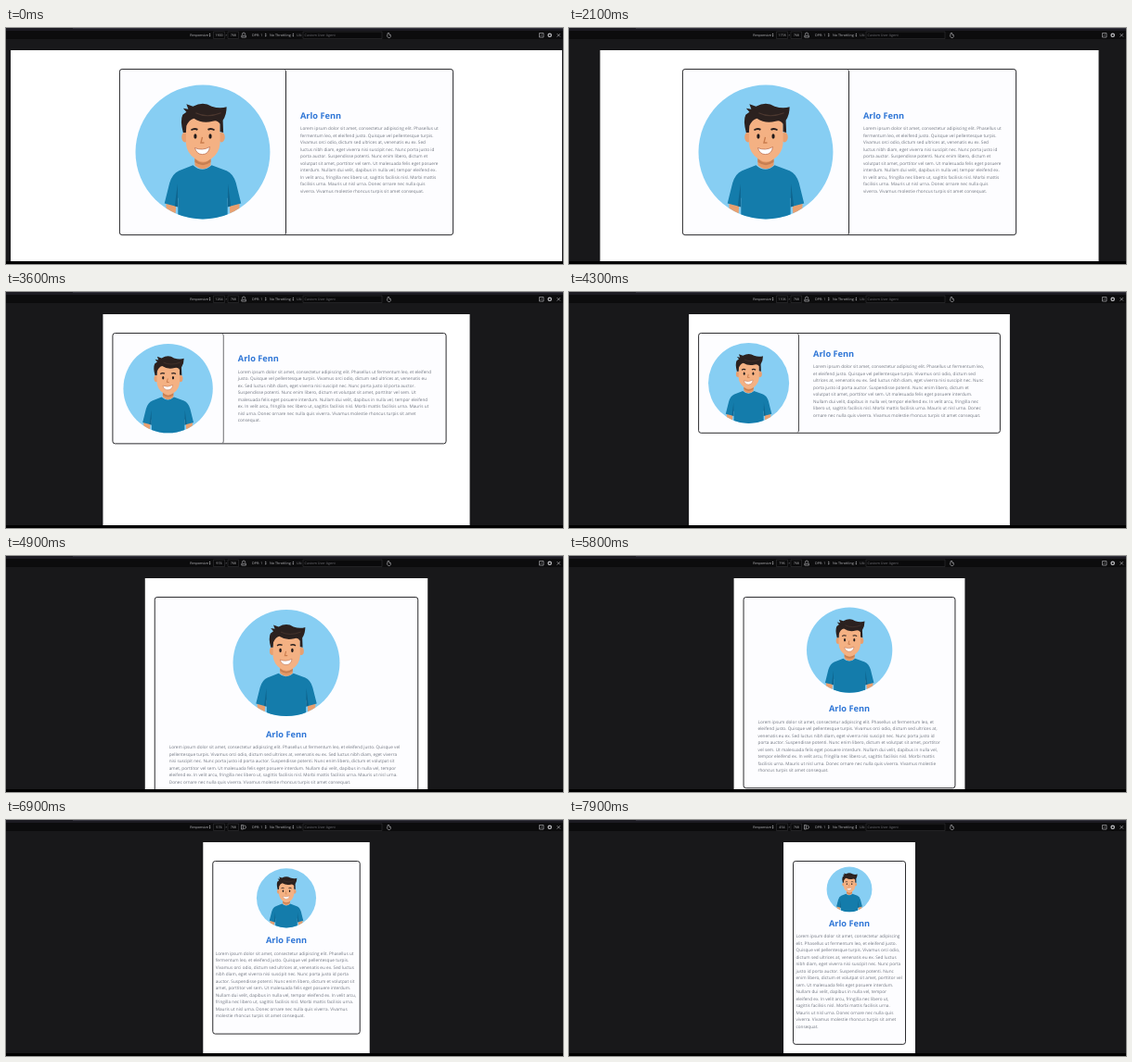
Animation, 600 px wide and 255 px high, one loop 8 s. Source, as an HTML page:

```html
<!DOCTYPE html>
<html lang="en">
<head>
<meta charset="utf-8">
<title>Responsive card</title>
<style>
  * { box-sizing: border-box; margin: 0; }
  html, body { width: 100%; height: 100%; overflow: hidden; background: #000; }
  body { position: relative; font-family: "Open Sans", "Noto Sans", sans-serif; text-rendering: geometricPrecision; }
  .desk { position: absolute; top: 0; left: 0; width: 600px; height: 252px; overflow: hidden; background: #18181a; }
  .bar { position: absolute; top: 0; left: 0; }
  .page {
    --scale: .3126;
    position: absolute; top: 24px; left: 302.4px;
    width: calc(var(--w) * 1px); height: 730px; overflow: hidden;
    background: #fff; container-type: inline-size;
    transform-origin: 0 0;
    transform: scale(var(--scale)) translateX(-50%);
  }
  .card {
    max-width: 1152px; margin: 64px 32px;
    border: 3px solid #1d1d20; border-radius: 10px; background: #fdfdff;
  }
  .pic { overflow: hidden; }
  .pic svg { display: block; width: 50%; margin: 0 auto; }
  .info { padding: 0 8px 48px; }
  h1 { font-size: 29.5px; line-height: 40px; font-weight: 700; color: #2f76d6; text-align: center; margin-bottom: 14px; }
  p { font-size: 15.04px; line-height: 24px; color: #70757f; }
  @container (min-width: 768px) { .info { padding: 0 48px 48px; } }
  @container (min-width: 1024px) {
    .card { display: flex; align-items: center; }
    .pic { flex: 0 0 33.333%; border-right: 3px solid #1d1d20; border-radius: 8px; }
    .pic svg { width: 100%; }
    .info { flex: 1; padding: 0 48px; }
    h1 { text-align: left; }
  }
  @container (min-width: 1280px) {
    .card { margin: 64px auto; }
    .pic { flex-basis: 50%; }
  }
</style>
</head>
<body>
<div class="desk">
  <svg class="bar" width="600" height="24" font-size="3.7" fill="#b9b9bd">
    <path fill="#1c1b22" d="M0 0h600v3H0z"/>
    <path fill="#33323c" d="M72 0h528v1H72z"/>
    <path fill="#0c0c0d" d="M0 3h600v9H0z"/>
    <g fill="#0a0a0b" stroke="#38383d" stroke-width=".5">
      <path d="M223.5 4h12v7.500h-12zM239 4h11.500v7.500H239zM320 4h85v7.500h-85z"/>
    </g>
    <text x="198.300" y="9">Responsive</text>
    <text id="size" x="229.500" y="9" text-anchor="middle"></text>
    <text x="236.300" y="9" fill="#77777c">×</text>
    <text x="244.800" y="9" text-anchor="middle">768</text>
    <text x="265" y="9">DPR: 1</text>
    <text x="284" y="9">No Throttling</text>
    <text x="313" y="9" fill="#8a8a8f">UA:</text>
    <text x="321.500" y="9" fill="#707076">Custom User Agent</text>
    <path d="M218.800 7.200l.8-1.600.8 1.600zm0 .8l.8 1.600.8-1.600zM279 7.200l.8-1.600.8 1.600zm0 .8l.8 1.600.8-1.600zM308.500 7.200l.8-1.600.8 1.600zm0 .8l.8 1.600.8-1.600z"/>
    <g fill="none" stroke="#c4c4c8" stroke-width=".6">
      <g id="turn"><path d="M253.800 8.200h4.600v1.900h-4.600zM254.300 7.300q.2-2.300 1.800-2.300t1.800 2.300"/></g>
      <path d="M411 8V5.800q1-1.200 2 0V7.500h1.300v2q-.5 1-1.500 1h-1l-1.500-2z"/>
      <path d="M574.500 5.500h4.500v4.500h-4.500zM576 8.500l1.500-1.500"/>
      <circle cx="585.700" cy="7.800" r="1.700" stroke-width="1.200"/>
      <path d="M593.600 6.100l3.400 3.400m0-3.400l-3.400 3.400"/>
    </g>
  </svg>

  <div class="page" id="page">
    <div class="card">
      <div class="pic">
        <svg viewBox="124 45.500 177 177">
          <clipPath id="disc"><circle cx="212.500" cy="134" r="72"/></clipPath>
          <circle cx="212.500" cy="134" r="72" fill="#87cef3"/>
          <g clip-path="url(#disc)">
            <path fill="#e8a070" d="M173 186l11 3-1 18h-9zM252 186l-11 3 1 18h9z"/>
            <path fill="#147cab" d="M202 148Q212 157 222 148L238 154Q245 157 248 167L253.500 189 242 192 239 183V208H186V183L183 192 171.500 189 177 167Q180 157 187 154Z"/>
            <path fill="#0f6690" d="M185.500 168l-3 24 3.500 1zM239.500 168l3 24-3.500 1z"/>
            <path fill="#e59a68" d="M204 136h17v12q-8.500 8-17 0z"/>
            <path fill="#c77f52" d="M204 141q8.500 9 17 0v4q-8.500 6-17 0z"/>
            <ellipse cx="193.500" cy="118" rx="3.600" ry="5.500" fill="#e8a070"/>
            <ellipse cx="232.500" cy="118" rx="3.600" ry="5.500" fill="#e8a070"/>
            <path fill="#f4b183" d="M194.500 96h36.500v29q-1 10-9 16-9 7-18 0-8.500-6-9.500-16z"/>
            <path fill="#2b211f" d="M191.500 113Q188 100 191 94L195 91 191.500 87 197 88 195 82.500 202 85Q213 79 222 85 231 88 238 85.500 238 94 234 100L234.500 113 231 112V104Q228 99 223 101 212 104 203 98 198 99 195 106L194.500 113Z"/>
            <path fill="none" stroke="#4b372f" stroke-width="1" d="M205 92q12 6 27 0"/>
            <path fill="none" stroke="#2b211f" stroke-width="1.800" d="M200 110.500q3.500-2.500 7-.5M218 110q3.500-2 7 .5"/>
            <ellipse cx="204.500" cy="117" rx="1.600" ry="2.700" fill="#211a1a"/>
            <ellipse cx="220.500" cy="117" rx="1.600" ry="2.700" fill="#211a1a"/>
            <path fill="none" stroke="#c97c4d" stroke-width="1.400" d="M212 118l-1.500 6h3.500"/>
            <path fill="#fff" stroke="#b8694b" stroke-width=".7" d="M204 129.500q8 3.500 16-1-1 8-8 8-6 0-8-7z"/>
          </g>
        </svg>
      </div>
      <div class="info">
        <h1>Arlo Fenn</h1>
        <p>Lorem ipsum dolor sit amet, consectetur adipiscing elit. Phasellus ut fermentum leo, et eleifend justo. Quisque vel pellentesque turpis. Vivamus orci odio, dictum sed ultrices at, venenatis eu ex. Sed luctus nibh diam, eget viverra nisi suscipit nec. Nunc porta justo id porta auctor. Suspendisse potenti. Nunc enim libero, dictum et volutpat sit amet, porttitor vel sem. Ut malesuada felis eget posuere interdum. Nullam dui velit, dapibus in nulla vel, tempor eleifend ex. In velit arcu, fringilla nec libero ut, sagittis facilisis nisl. Morbi mattis facilisis urna. Mauris ut nisl urna. Donec ornare nec nulla quis viverra. Vivamus molestie rhoncus turpis sit amet consequat.</p>
      </div>
    </div>
  </div>
</div>
<script>
  const LOOP = 8000, STEP = 100, HEIGHT = 768;
  // [time, viewport width] along the drag
  const drag = [
    [1300, 1900], [2100, 1718], [2200, 1690], [3100, 1434], [3600, 1264], [4000, 1172],
    [4900, 974], [5800, 796], [6700, 609], [6900, 574], [7600, 475], [7900, 454]
  ];
  const page = document.getElementById('page');
  const size = document.getElementById('size');
  const turn = document.getElementById('turn');

  function widthAt(t) {
    const i = drag.findIndex(([time]) => time >= t);
    if (i <= 0) return drag[0][1];
    const [t0, w0] = drag[i - 1], [t1, w1] = drag[i];
    return Math.round(w0 + (w1 - w0) * (t - t0) / (t1 - t0));
  }

  function draw() {
    const t = Math.floor(performance.now() % LOOP / STEP) * STEP;
    const w = widthAt(t);
    page.style.setProperty('--w', w);
    size.textContent = w;
    turn.setAttribute('transform', w < HEIGHT ? 'rotate(90 256 7.600)' : '');
    requestAnimationFrame(draw);
  }
  draw();
</script>
</body>
</html>
```
